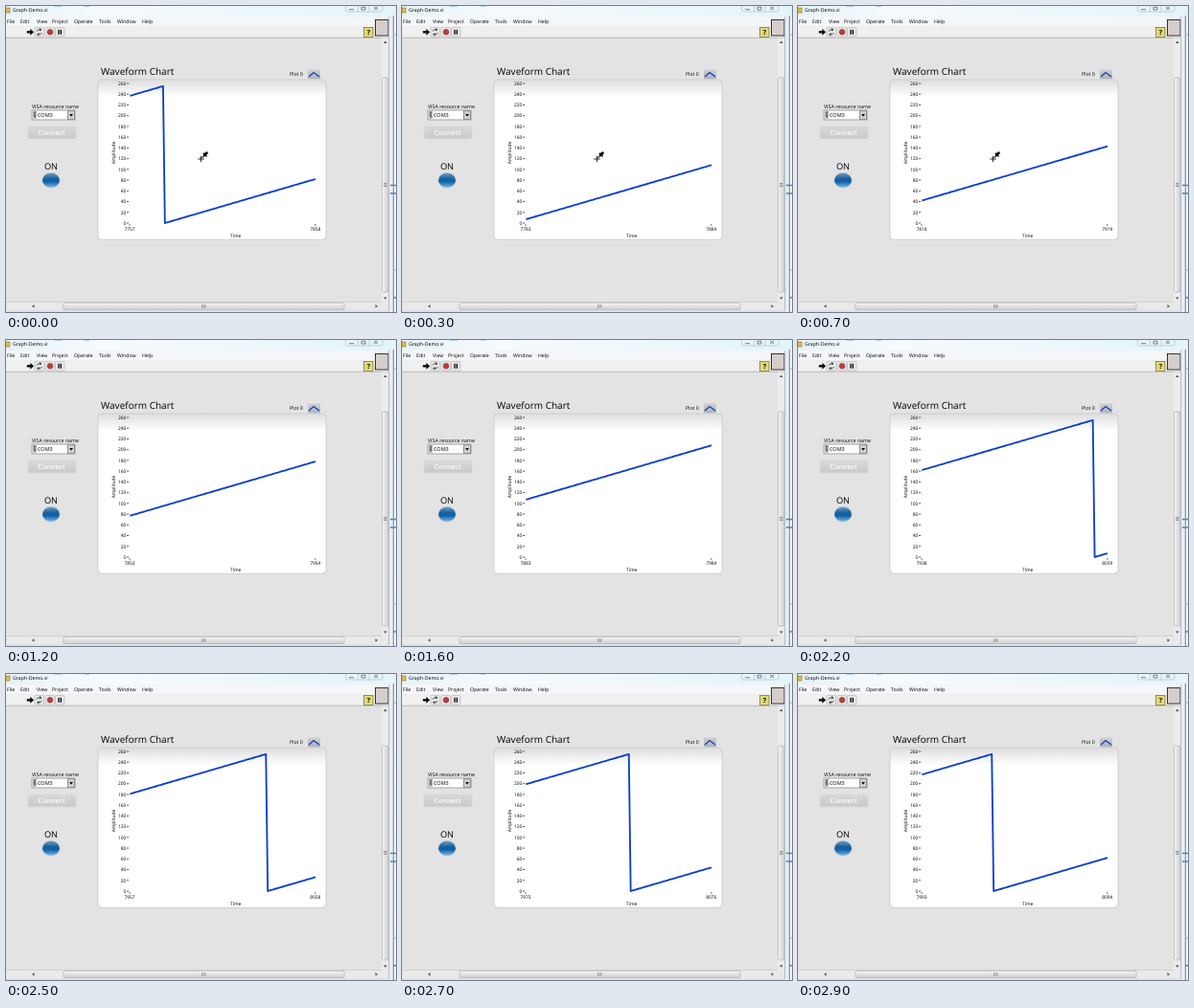
An HTML page for the animation above (3000 ms loop, 407 px wide and 320 px high).

```html
<!DOCTYPE html>
<html lang="en">
<head>
<meta charset="utf-8">
<title>Waveform chart</title>
<style>
html, body { margin: 0; width: 100%; height: 100%; overflow: hidden; background: #e3e3e3; }
svg { display: block; width: 407px; height: 320px; }
text { font: 5.2px "Open Sans", "Noto Sans", sans-serif; fill: #000; text-rendering: geometricPrecision; }
.axis text { font-size: 4.9px; }
.end { text-anchor: end; }
.mid { text-anchor: middle; }
#cursor { animation: cursor 3s step-end infinite; }
@keyframes cursor {
  0% { transform: none; visibility: visible; }
  26.6667% { transform: translate(-127px, 10px); visibility: visible; }
  33.3333%, 100% { transform: none; visibility: hidden; }
}
</style>
</head>
<body>
<svg viewBox="0 0 407 320">
  <defs>
    <linearGradient id="title"><stop offset="0" stop-color="#e6f3f8"/><stop offset=".25" stop-color="#f6fbfd"/><stop offset="1" stop-color="#e4f4f9"/></linearGradient>
    <linearGradient id="plate" x2="0" y2="1"><stop offset="0" stop-color="#dedede"/><stop offset=".11" stop-color="#fff"/></linearGradient>
    <linearGradient id="button" x2="0" y2="1"><stop offset="0" stop-color="#d8d8d8"/><stop offset="1" stop-color="#cacaca"/></linearGradient>
    <linearGradient id="legend" x2="0" y2="1"><stop offset="0" stop-color="#d0d0d0"/><stop offset="1" stop-color="#b2b2b2"/></linearGradient>
    <linearGradient id="led" x2="0" y2="1"><stop offset="0" stop-color="#6d9cc3"/><stop offset=".4" stop-color="#17609f"/><stop offset=".6" stop-color="#0f60a9"/><stop offset="1" stop-color="#7ab6e2"/></linearGradient>
    <linearGradient id="thumbV"><stop offset="0" stop-color="#f5f5f5"/><stop offset="1" stop-color="#d2d2d4"/></linearGradient>
    <linearGradient id="thumbH" x2="0" y2="1"><stop offset="0" stop-color="#f5f5f5"/><stop offset="1" stop-color="#cfcfd1"/></linearGradient>
  </defs>

  <!-- window frame -->
  <rect width="407" height="320" fill="#e3e3e3"/>
  <rect width="407" height="11" fill="url(#title)"/>
  <path d="M50 0h8M82 0h5" stroke="#7fa3cf" stroke-width="1.2"/>
  <rect y="2" width="4" height="5" fill="#e6c34a" stroke="#6c5b20" stroke-width=".5"/>
  <text x="7" y="6.400">Graph-Demo.vi</text>
  <path d="M354.500 0V4Q354.500 6 356.500 6H391Q393 6 393 4V0M367.500 0V6M379 0V6" fill="none" stroke="#b3c0ca" stroke-width=".7"/>
  <path d="M358 3.700h5M371 1.200h4v2.800h-4zM384 .7l4 3.300M388 .7l-4 3.300" fill="none" stroke="#69737d" stroke-width=".9"/>
  <rect y="11" width="400" height="10.500" fill="#f4f6fa"/>
  <rect y="21.500" width="400" height="11.500" fill="#f0f0f0"/>
  <path d="M0 33.200H400" stroke="#a5a5a5" stroke-width=".7"/>
  <g id="menu"></g>

  <!-- toolbar -->
  <path d="M21.800 26h3.500v-2.300l3.800 3.500-3.800 3.500v-2.300h-3.500z" fill="#111"/>
  <g fill="#e9e9e9" stroke="#b4b4b4" stroke-width=".6">
    <rect x="30" y="22.500" width="9.500" height="9.500" rx="1"/>
    <rect x="41" y="22.500" width="9.500" height="9.500" rx="1"/>
    <rect x="51.500" y="22.500" width="9.500" height="9.500" rx="1"/>
  </g>
  <path d="M32 26.500q1-2.500 4-1.800M37.500 28q-1 2.300-4 1.700M35 23.500l2 1.300-2 1.200M34.500 28.500l-2 1.200 2 1.200" fill="none" stroke="#333" stroke-width=".9"/>
  <circle cx="46" cy="27.200" r="2.900" fill="#c23a38" stroke="#7d4a48" stroke-width=".6"/>
  <path d="M55 24.700v5M57.300 24.700v5" stroke="#111" stroke-width="1.400"/>
  <rect x="373.500" y="22.500" width="9.500" height="10" fill="#e3db6c" stroke="#666" stroke-width=".7"/>
  <text class="mid" x="378.300" y="30" style="font-size:7px;font-weight:700">?</text>
  <rect x="385.500" y="14.500" width="13.500" height="16.500" fill="#d6cecb" stroke="#222" stroke-width=".9"/>

  <!-- scrollbars -->
  <rect x="392" y="33.500" width="7.500" height="276" fill="#ececec"/>
  <rect x="392.500" y="75" width="6.500" height="224" rx="1" fill="url(#thumbV)" stroke="#a9a9a9" stroke-width=".6"/>
  <path d="M394 185.500h3.500M394 187h3.500M394 188.500h3.500" stroke="#777" stroke-width=".7"/>
  <path d="M394 39l1.800-2.500 1.800 2.500zM394 304.500l1.800 2.500 1.800-2.500z" fill="#555"/>
  <rect y="309.500" width="399.500" height="9" fill="#e9e9e9"/>
  <path d="M0 309.500H392" stroke="#c4c4c4" stroke-width=".6"/>
  <rect x="60" y="310.500" width="293" height="7" rx="1" fill="url(#thumbH)" stroke="#a9a9a9" stroke-width=".6"/>
  <path d="M204.500 312.300v3.500M206.200 312.300v3.500M207.900 312.300v3.500" stroke="#777" stroke-width=".7"/>
  <path d="M29.500 312.200l-2.500 1.800 2.500 1.800zM385.500 312.200l2.500 1.800-2.500 1.800z" fill="#555"/>
  <rect y="318.500" width="407" height="1.500" fill="#d6e4ef"/>

  <!-- right edge -->
  <rect x="399.500" y="11" width="4.500" height="309" fill="#e8f1f8"/>
  <path d="M399.700 11V319" stroke="#9ba4ab" stroke-width=".7"/>
  <rect x="404" y="11" width="3" height="309" fill="#f1f4f8"/>
  <path d="M404.300 10V320" stroke="#56626e" stroke-width=".8"/>
  <path d="M404.500 30h2.500M404.500 276h2.500" stroke="#98a6b5" stroke-width=".8"/>
  <path d="M401 187.500h6M401 196h6M404 305h3" stroke="#4f81bd" stroke-width="1.300"/>

  <!-- controls -->
  <text x="27" y="107" style="font-size:5.250px">VISA resource name</text>
  <rect x="27" y="109" width="45" height="10" fill="#fdfdfd" stroke="#8e8e8e" stroke-width=".8"/>
  <rect x="27.500" y="109.500" width="4.500" height="9" fill="#c9c9c9"/>
  <path d="M28.500 111h3M28.500 113h2M28.500 115h3M30 111v6" stroke="#444" stroke-width=".8"/>
  <text x="33" y="116.300" style="font-size:5.500px">COM3</text>
  <rect x="64.500" y="109.800" width="7" height="8.500" fill="#d2d2d2" stroke="#6f6f6f" stroke-width=".7"/>
  <path d="M66 113h4l-2 2.700z" fill="#111"/>
  <rect x="23" y="126" width="50" height="13" rx="1.500" fill="url(#button)" stroke="#d9d9d9" stroke-width=".8"/>
  <text class="mid" x="47.700" y="135.300" style="font-size:7.100px;font-weight:600;fill:#fcfcfc">Connect</text>
  <text class="mid" x="47" y="171" style="font-size:9.200px">ON</text>
  <ellipse cx="47" cy="182.300" rx="9.600" ry="8.200" fill="#c3c8cc"/>
  <ellipse cx="47" cy="182.200" rx="8.900" ry="7.500" fill="url(#led)"/>

  <!-- chart -->
  <text x="99" y="72" style="font-size:10px">Waveform Chart</text>
  <text x="296" y="73.300">Plot 0</text>
  <rect x="315" y="66.500" width="13" height="9.800" fill="url(#legend)"/>
  <path d="M316 74l5-4.500 6 4.500" fill="none" stroke="#0a3fd2" stroke-width="1.300"/>
  <rect x="96" y="77" width="238" height="167.300" rx="4" fill="url(#plate)" stroke="#c9c9c9" stroke-width=".8"/>
  <g class="axis">
    <g id="scale"></g>
    <path d="M129 228v2M322.800 228v2" stroke="#333" stroke-width=".7"/>
    <text class="mid" id="first" x="129" y="235.300"></text>
    <text class="mid" id="last" x="322.800" y="235.300"></text>
    <text class="mid" x="239.700" y="241.800">Time</text>
    <text class="mid" transform="translate(113.700 153.500) rotate(-90)">Amplitude</text>
  </g>
  <polyline id="trace" fill="none" stroke="#0a3fd2" stroke-width="1.850" stroke-linejoin="round"/>

  <g id="cursor">
    <path d="M200.300 160h6.400M203.500 156.800v6.400" stroke="#111" stroke-width=".9"/>
    <path d="M204.500 158.700l3.200-3.200" stroke="#333" stroke-width="1.300"/>
    <path d="M205.800 153.700l3.800 3.800" stroke="#111" stroke-width="1.300"/>
    <path d="M207.300 155.800l2-2" stroke="#111" stroke-width="3" stroke-linecap="round"/>
  </g>
</svg>
<script>
const $ = id => document.getElementById(id);
const left = 129.4, right = 323, span = 101, wrap = 256, phase = 7776;
const yOf = v => 227 - v * 146 / 260;

const menu = { File: 1, Edit: 15, View: 32, Project: 48, Operate: 71, Tools: 97, Window: 116, Help: 142 };
$('menu').innerHTML = Object.entries(menu)
  .map(([name, x]) => `<text x="${x}" y="18">${name}</text>`).join('');

let scale = '';
for (let v = 0; v <= 260; v += 20) {
  const y = yOf(v);
  scale += `<text class="end" x="125.300" y="${y + 1.8}">${v}</text>` +
    `<path d="M126 ${y}h2.200" stroke="#333" stroke-width=".8"/>`;
}
$('scale').innerHTML = scale;

// [update number, first sample on screen]
const keys = [[0, 7757], [7, 7818], [11, 7853], [14, 7883], [18, 7919], [22, 7957], [26, 7993]];
const pauses = [9, 15, 24]; // ticks without an update

function firstSample(tick) {
  const n = tick - pauses.filter(p => p <= tick).length;
  const i = Math.max(1, keys.findIndex(k => k[0] >= n));
  const [n0, s0] = keys[i - 1], [n1, s1] = keys[i];
  return Math.round(s0 + (s1 - s0) * (n - n0) / (n1 - n0));
}

function draw(start) {
  const pts = [];
  for (let i = 0; i <= span; i++) {
    const v = (start + i - phase + wrap) % wrap;
    pts.push((left + (right - left) * i / span).toFixed(2) + ',' + yOf(v).toFixed(2));
  }
  $('trace').setAttribute('points', pts.join(' '));
  $('first').textContent = start;
  $('last').textContent = start + span;
}

const cursorMotion = $('cursor').getAnimations()[0];
const origin = performance.now();
let shown = -1;
function frame() {
  const t = Math.max(0, performance.now() - origin) % 3000;
  const tick = Math.floor(t / 100);
  if (cursorMotion) cursorMotion.currentTime = t;
  if (tick !== shown) draw(firstSample(shown = tick));
  requestAnimationFrame(frame);
}
frame();
</script>
</body>
</html>
```
